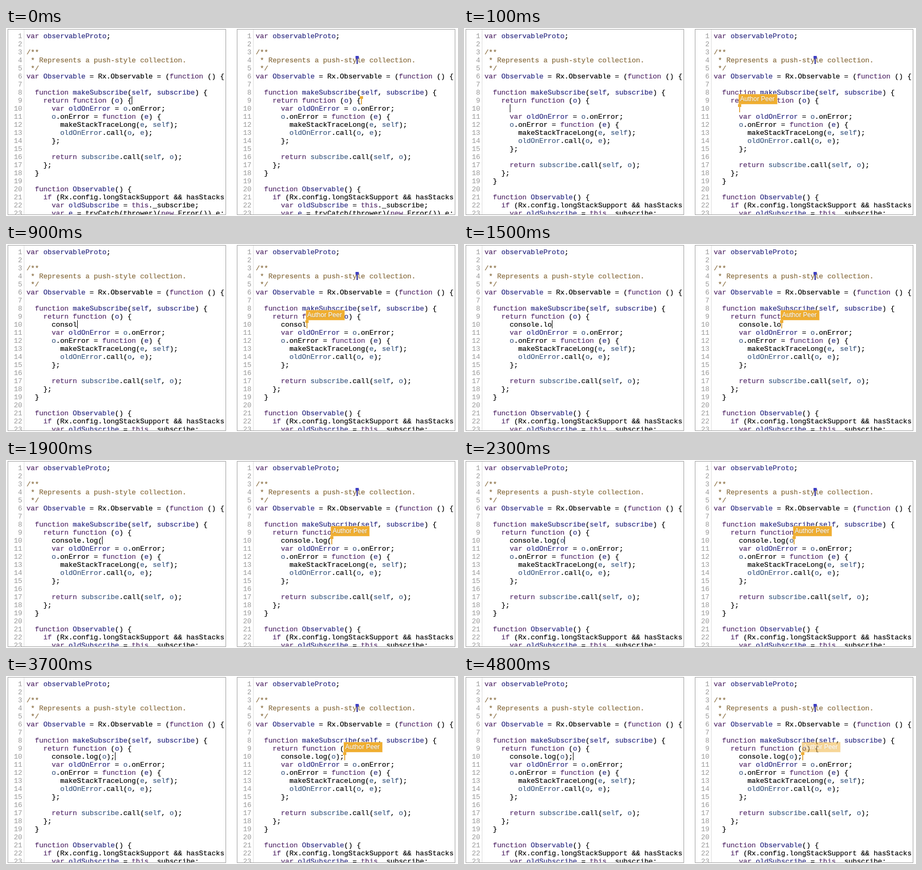
Write an HTML page that moves like this. It is 838 px wide and 350 px high and loops after 4900 ms.

```html
<!DOCTYPE html>
<html>
<head>
<meta charset="utf-8">
<style>
html, body { margin: 0; width: 100%; height: 100%; overflow: hidden; background: #fff; }
.pane {
  position: absolute; top: 2px; width: 403px; height: 344px;
  border: 1px solid #a2a2a2; overflow: hidden; background: #fff;
  font: 13px/15px "Liberation Mono", "Courier New", monospace; color: #000;
}
.gutter, .code { position: absolute; top: 0; padding-top: 5px; white-space: pre; }
.gutter {
  left: 0; width: 26px; height: 100%; padding-right: 3px; text-align: right;
  color: #999; border-right: 1px solid #ddd;
}
.code { left: 34px; -webkit-text-stroke: .2px; }
.k { color: #532a69; }
.d { color: #2a2a82; }
.v { color: #3b5880; }
.c { color: #866a3c; }
.caret { position: absolute; width: 1px; height: 15px; background: #000; }
.peer { width: 2px; background: var(--bar); }
.peer::before {
  content: ""; position: absolute; left: -2px; top: 0;
  width: 6px; height: 5px; background: var(--knob);
}
.label {
  position: absolute; left: 0; top: -18px; padding: 0 2px; width: 66px; height: 17px;
  background: #f0ae30; color: #fff; white-space: nowrap;
  font: 12px/17px "Liberation Sans", Arial, sans-serif;
  text-shadow: 0 1px 1px #8888; box-shadow: 0 0 0 1px #f2bd5c;
}
</style>
</head>
<body>
<script>
// @name marks a definition, ~name a local variable
const source = `var @observableProto;

/**
 * Represents a push-style collection.
 */
var @Observable = Rx.Observable = (function () {

  function @makeSubscribe(@self, @subscribe) {
    return function (@o) {
      var @oldOnError = ~o.onError;
      ~o.onError = function (@e) {
        makeStackTraceLong(~e, ~self);
        ~oldOnError.call(~o, ~e);
      };

      return ~subscribe.call(~self, ~o);
    };
  }

  function @Observable() {
    if (Rx.config.longStackSupport && hasStacks
      var @oldSubscribe = this._subscribe;
      var @e = tryCatch(thrower)(new Error()).e;`.split("\n");

const LOOP = 4900, ENTER = 100, CHAR = 7.8, LINE = 15, ROWS = 23;
const typed = "console.log(o);";
const keys = [200, 300, 400, 600, 700, 900, 1000, 1100, 1300, 1400, 1700, 1900, 2200, 2800, 3100];

const span = (cls, text) => `<span class="${cls}">${text}</span>`;

function paint(line) {
  if (/^( \*|\/\*)/.test(line)) return span("c", line);
  return line.replace(/&/g, "&amp;").replace(
    /@(\w+)|~(\w+)|\b(var|function|return|if|this|new)\b/g,
    (_, d, v, k) => d ? span("d", d) : v ? span("v", v) : span("k", k));
}

function add(parent, cls) {
  const el = document.createElement("div");
  el.className = cls;
  parent.append(el);
  return el;
}

function makePane(x) {
  const pane = add(document.body, "pane");
  pane.style.left = x + "px";
  add(pane, "gutter").textContent = Array.from({ length: ROWS }, (_, i) => i + 1).join("\n");
  return { pane, code: add(pane, "code") };
}

function makePeer(pane, bar, knob) {
  const el = add(pane, "caret peer");
  el.style.setProperty("--bar", bar);
  el.style.setProperty("--knob", knob);
  return el;
}

function place(el, row, col) {
  el.style.left = 34 + col * CHAR + "px";
  el.style.top = 4 + (row - 1) * LINE + "px";
}

const left = makePane(3), right = makePane(428);
const caret = add(left.pane, "caret");
const reader = makePeer(right.pane, "#24248f", "#4242c4");
const writer = makePeer(right.pane, "#e3b052", "#eeae35");
const label = add(writer, "label");
label.textContent = "Author Peer";
place(reader, 4, 24);

let shown;
function draw(t) {
  const entered = t >= ENTER;
  const count = keys.filter(k => k <= t).length;
  const state = entered ? count : -1;
  if (state !== shown) {
    shown = state;
    const lines = source.slice();
    if (entered) lines.splice(9, 0, "      " + typed.slice(0, count).replace("(o", "(~o"));
    left.code.innerHTML = right.code.innerHTML = lines.slice(0, ROWS).map(paint).join("\n");
    for (const el of [caret, writer]) place(el, entered ? 10 : 9, entered ? 6 + count : 25);
  }
  label.style.opacity = entered ? Math.min(1, (LOOP + 50 - t) / 300) : 0;
}

const start = performance.now();
function tick() {
  draw((performance.now() - start) % LOOP);
  requestAnimationFrame(tick);
}
tick();
</script>
</body>
</html>
```
